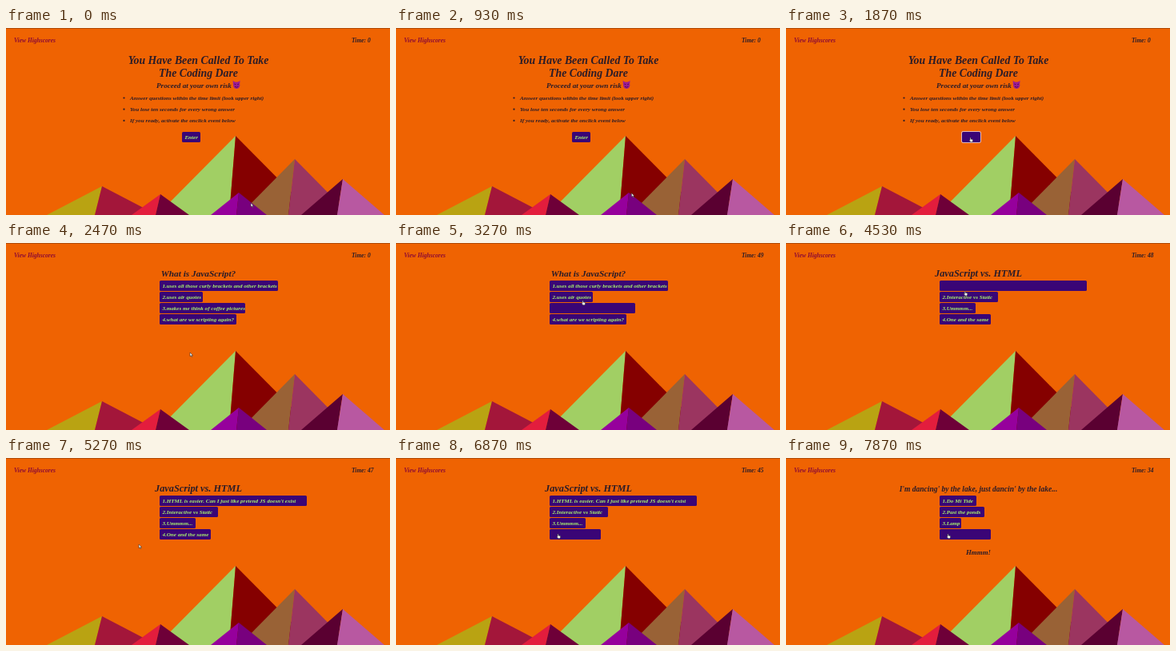
An HTML page for the animation above (8000 ms loop, 480x234 px).

```html
<!DOCTYPE html>
<html lang="en">
<head>
<meta charset="utf-8">
<title>Coding quiz</title>
<style>
  html, body { margin: 0; width: 100%; height: 100%; overflow: hidden; background: #ef6302; }
  svg { display: block; width: 480px; height: 234px; }
  text { font: italic bold 7.1px "Liberation Serif", "Noto Serif", serif; fill: #2b1c28; white-space: pre; }
</style>
</head>
<body>
<svg viewBox="0 0 480 234">
  <rect width="480" height="234" fill="#ef6302"/>
  <rect width="480" height="1" fill="#b04c0a"/>
  <g id="hills"></g>
  <text x="10" y="17.6" style="font-size:7.5px;fill:#8c0a35">View Highscores</text>
  <text id="timer" x="432" y="17.6" style="font-size:7.5px"></text>
  <g id="page"></g>
  <g id="cursor" stroke="#222" stroke-width=".6" fill="#eee"><path/></g>
</svg>
<script>
const LOOP = 8000;
const $ = id => document.getElementById(id);

// apex x, apex y, half of the base, foot of the ridge, left and right colour
const hills = [
  [287, 135, 98, 279, '#a1cf64', '#850000'],
  [361, 164, 69, 353, '#996236', '#9b3560'],
  [120, 198, 69, 127, '#b9a312', '#a3163a'],
  [193, 208, 36, 197, '#e31d3d', '#6e0038'],
  [291, 206, 35, 288, '#96009c', '#78007e'],
  [421, 189, 52, 414, '#5a0031', '#b858a1'],
];
hills[2][3] = 111;
hills[3][3] = 187;
$('hills').innerHTML = hills.map(([x, y, half, foot, a, b]) =>
  `<path fill="${a}" d="M${x} ${y}L${x - half} 234H${foot}z"/>
   <path fill="${b}" d="M${x} ${y}L${foot} 234H${x + half}z"/>`).join('');

const button = (label, x, y, w) => ({ label, x, y, w, h: 13 });
const answers = (widths, labels) =>
  labels.map((s, i) => button(`${i + 1}.${s}`, 192, 47 + 14 * i, widths[i]));

const pages = [
  { start: 0, press: 1670, buttons: [button('Enter', 220, 130, 23)] },
  { start: 1990, press: 4040, title: 'What is JavaScript?', size: 11.3,
    buttons: answers([148, 54, 107, 96], ['uses all those curly brackets and other brackets',
      'uses air quotes', 'makes me think of coffee pictures', 'what are we scripting again?']) },
  { start: 4180, press: 7090, title: 'JavaScript vs. HTML', size: 12.3,
    buttons: answers([184, 73, 45, 64], ["HTML is easier. Can I just like pretend JS doesn't exist",
      'Interactive vs Static', 'Ummmm...', 'One and the same']) },
  { start: 7270, press: LOOP, title: "I'm dancing' by the lake, just dancin' by the lake...", size: 9.5,
    buttons: answers([46, 56, 27, 64], ['Do Mi Tide', 'Past the ponds', 'Lamp', 'One and all']) },
];

// time, x, y of the pointer tip
const path = [
  [0, 306, 219], [870, 306, 219], [1270, 230, 137], [3070, 230, 137], [3210, 233, 78],
  [3270, 233, 72], [3670, 235, 52], [4470, 235, 52], [4870, 158, 106], [5070, 158, 106],
  [5270, 166, 108], [5600, 186, 108], [5870, 186, 108], [6000, 188, 104], [6270, 188, 104],
  [6500, 212, 82], [6730, 202, 95], [LOOP, 202, 95],
];
const arrow = 'M0 0V6L1.5 4.7L2.6 7L3.6 6.5L2.6 4.3H4.4z';
const hand = 'M0 0.6Q.7 -.4 1.3 .6V2.5L4.4 3.2V5.6L3.6 7.2H1L-1.2 4.6L-.6 3.8L0 4.3z';

function pointer(t) {
  const i = path.findIndex(p => p[0] > t);
  const [t0, x0, y0] = path[i - 1], [t1, x1, y1] = path[i];
  const k = (t - t0) / (t1 - t0);
  return [x0 + (x1 - x0) * k, y0 + (y1 - y0) * k];
}

const text = (s, x, y, size, anchor = 'start') =>
  `<text x="${x}" y="${y}" text-anchor="${anchor}" style="font-size:${size}px">${s}</text>`;

function drawButton({ label, x, y, w, h }, hover, pressed) {
  const box = `<rect x="${x}" y="${y}" width="${w}" height="${h}" rx="1.6" fill="#3a0576"/>`;
  const ring = pressed ? `<rect x="${x - .5}" y="${y - .5}" width="${w + 1}" height="${h + 1}"
    rx="1.6" fill="none" stroke="#ddd0ea" stroke-width=".8"/>` : '';
  const caption = hover ? '' : `<text x="${x + 3.4}" y="${y + 9}" style="fill:#a6f26e">${label}</text>`;
  return box + ring + caption;
}

const rules = ['Answer questions within the time limit (look upper right)',
  'You lose ten seconds for every wrong answer', 'If you ready, activate the onclick event below'];
const imp = `<g fill="#9c1d95"><path d="M283.6 66L288 68.5L292.6 66L292 71H284z"/><circle cx="288.2" cy="71.7" r="4.2"/></g>
  <path d="M285.5 70l1.8 1M291 70l-1.8 1M286 73.3q2.2 1.8 4.4 0" fill="none" stroke="#3a0840" stroke-width=".8"/>`;
const intro = text('You Have Been Called To Take', 240.5, 44.5, 13.8, 'middle') +
  text('The Coding Dare', 240.5, 60.5, 13.8, 'middle') +
  text('Proceed at your own risk', 188, 75, 9.15) + imp +
  rules.map((s, i) => `<circle cx="147.5" cy="${87.5 + 14.2 * i}" r="1.1" fill="#2b1c28"/>` +
    text(s, 155, 89.8 + 14.2 * i, 7.15)).join('');

// counts down each second; the wrong second answer costs ten
const timeLeft = t =>
  t < 2870 ? 0 : 50 - Math.floor((t - 1870) / 1000) - (t >= 7270 ? 10 : 0);

let shown = '';
function render(t) {
  const page = pages.findLast(p => t >= p.start);
  const [x, y] = pointer(t);
  const [hx, hy] = pointer(Math.max(0, t - 50)); // hover trails the pointer
  const over = b => hx >= b.x && hx <= b.x + b.w && hy >= b.y && hy <= b.y + b.h;

  const html = (page.title ? text(page.title, 240.5, 42, page.size, 'middle') : intro) +
    page.buttons.map(b => drawButton(b, over(b), over(b) && t >= page.press)).join('') +
    (t >= 7270 ? text('Hmmm!', 240.5, 121, 8.9, 'middle') : '');
  if (html !== shown) $('page').innerHTML = shown = html;

  $('timer').textContent = 'Time: ' + timeLeft(t);
  $('cursor').setAttribute('transform', `translate(${x} ${y}) scale(.8)`);
  $('cursor').firstChild.setAttribute('d', page.buttons.some(over) ? hand : arrow);
}

const began = performance.now();
function loop() {
  render((performance.now() - began) % LOOP);
  requestAnimationFrame(loop);
}
loop();
</script>
</body>
</html>
```
